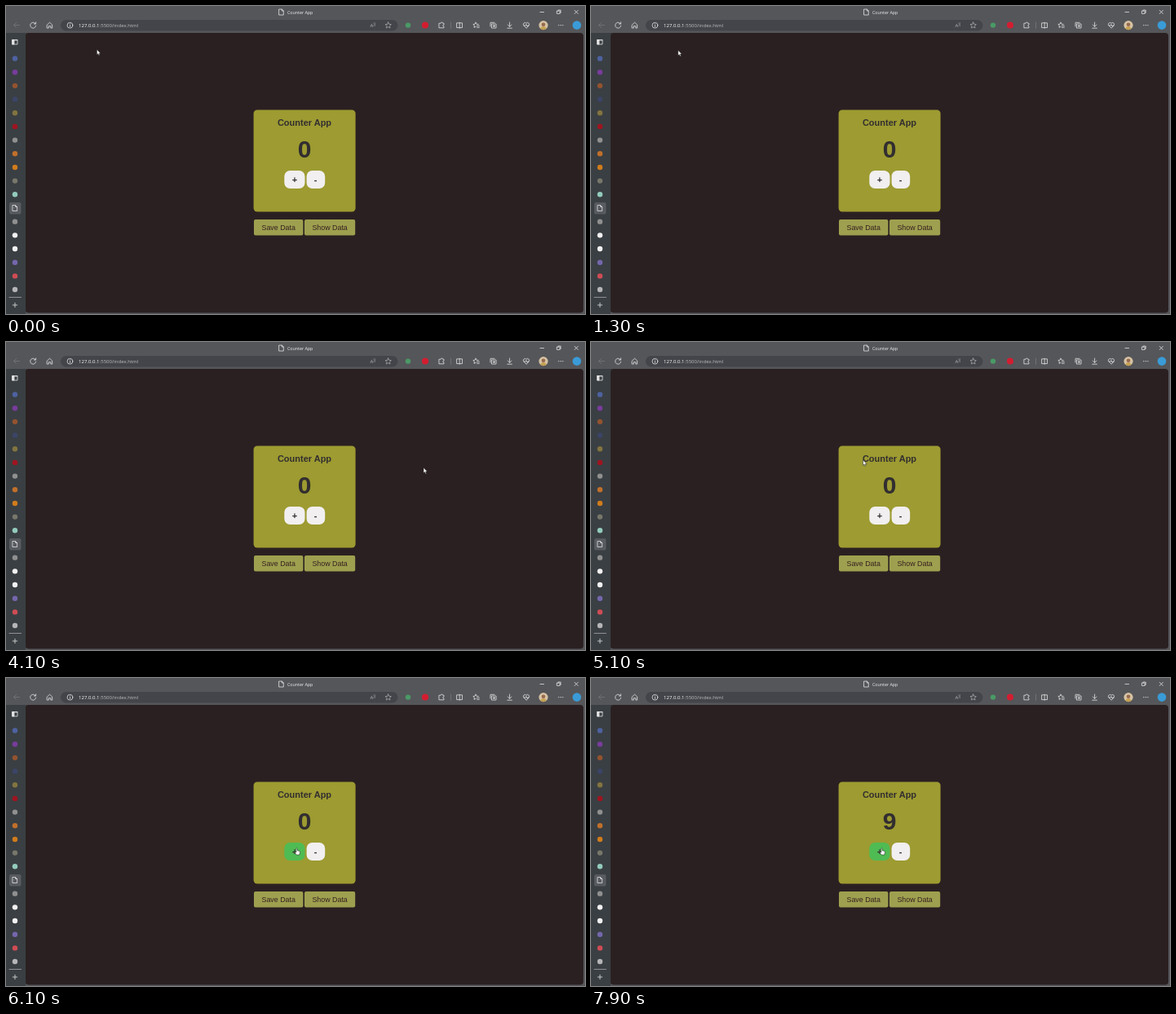
Recreate the animation shown at these times as an HTML page. Size 710 by 378 pixels, loop 8000 ms.

```html
<!DOCTYPE html>
<html lang="en">
<head>
<meta charset="utf-8">
<title>Counter App</title>
<style>
  html, body { margin: 0; width: 100%; height: 100%; overflow: hidden; background: #55565a; }
  svg { display: block; width: 710px; height: 378px; }
  .ui { font-family: "Open Sans", "Noto Sans", sans-serif; }
  .page { font-family: "Liberation Sans", Arial, sans-serif; text-anchor: middle; fill: #322e30; }
  .bold { font-weight: 700; }
  .line { fill: none; stroke: #e2e2e3; stroke-width: .8; stroke-linecap: round; stroke-linejoin: round; }
  .dim { stroke: #a6a7aa; }
  .faint { stroke: #77787c; }
  .key { fill: #f1eff0; }
  .wide { fill: #9ea04f; }
  .label { fill: #361f20; font-size: 8.9px; }
</style>
</head>
<body>
<svg viewBox="0 0 710 378">
  <rect width="710" height="378" fill="#55565a"/>
  <path d="M0 33H28V378H0Z" fill="#3a3f43"/>
  <path d="M24 376H710V378H24Z" fill="#55565a"/>
  <rect x="24" y="33" width="684" height="343.5" rx="4" fill="#2b2021"/>
  <rect x="67" y="17" width="413.5" height="13.5" rx="6.7" fill="#44454a"/>

  <g class="ui">
    <text x="345" y="9.6" font-size="5.3" fill="#f0f0f0">Counter App</text>
    <text x="89" y="25.6" font-size="6.05" fill="#fafafa">127.0.0.1<tspan fill="#bcbdc0">:5500/index.html</tspan></text>
    <text x="446.5" y="25.6" font-size="6" fill="#b4b5b8">A<tspan dy="-1.5" font-size="4.5">))</tspan></text>
  </g>

  <!-- window and toolbar icons -->
  <g class="line">
    <path id="file" d="M335 4H338.3L340.3 6V11H335ZM338.3 4V6H340.3"/>
    <path d="M655 7.5H659.5M675.8 6H679.2V9.4H675.8ZM677 6V5H680.2V8.3H679.2M697.2 5.3L701.4 9.5M701.4 5.3L697.2 9.5"/>
    <path class="faint" d="M16.5 23.5H9.5M12.5 20.5L9.5 23.5L12.5 26.5"/>
    <path d="M36.2 21.8A3.5 3.5 0 1 0 36.7 24.2M36.6 19.8V22H34.4"/>
    <path d="M50.5 23L53.6 20.2L56.7 23V27H54.8V24.6H52.4V27H50.5Z"/>
    <circle cx="78.5" cy="23.7" r="3.4"/>
    <path d="M78.5 23.5V25.4M78.5 21.9V22"/>
    <path class="dim" d="M468.7 19.9L469.8 22.3L472.4 22.6L470.5 24.4L471 27L468.7 25.7L466.4 27L466.9 24.4L465 22.6L467.6 22.3Z"/>
    <path d="M531.3 21.2H533.2A1.2 1.2 0 0 1 535.6 21.2H537V23A1.1 1.1 0 0 0 537 25.2V26.8H531.3Z"/>
    <path class="faint" d="M545.5 20V27.5"/>
    <path d="M553 20.8H559.5V26.6H553ZM556.2 20.2V27.2"/>
    <path d="M576 20.2L577 22.2L579.3 22.5M576 20.2L575 22.2L572.8 22.5L574.4 24L574 26.4L576 25.4M577.5 24.3H580.3M577.5 26.3H580.3"/>
    <path d="M595.8 22H601V27H595.8ZM594 25V20.3H599M598.4 23.2V25.8M597.1 24.5H599.7"/>
    <path d="M617.6 20V25.2M615.3 23L617.6 25.3L619.9 23M614.8 27.2H620.4"/>
    <path d="M638 27L634.8 23.7A1.8 1.8 0 0 1 638 21.3A1.8 1.8 0 0 1 641.2 23.7ZM635 24H637L638 22.6L639 25L640 24H641"/>
    <path d="M677.8 23.6H677.9M680.3 23.6H680.4M682.8 23.6H682.9" stroke-width="1.2"/>
  </g>
  <circle cx="659" cy="23.6" r="5.6" fill="#d6c3a3"/>
  <path d="M655 27.5Q659 22.5 663 27.5A5.6 5.6 0 0 1 655 27.5Z" fill="#c4a050"/>
  <circle cx="659" cy="22.8" r="2.3" fill="#97694f"/>

  <!-- sidebar -->
  <rect x="4" y="241" width="14.5" height="14.5" rx="2" fill="#585b60"/>
  <g class="line">
    <path d="M8 41.5H14V47H8Z"/>
    <path d="M8 41.5H10V47H8ZM8 42H14" fill="#e2e2e3"/>
    <use href="#file" x="-326.7" y="240.5"/>
    <path d="M4 357.5H18.5" class="dim"/>
    <path d="M11 364.3V369.7M8.3 367H13.7"/>
  </g>
  <g id="marks"></g>

  <!-- counter page -->
  <g class="page">
    <rect x="303.6" y="127.4" width="125" height="125.2" rx="4.5" fill="#9d9b31"/>
    <text class="bold" x="366" y="147" font-size="11">Counter App</text>
    <text class="bold" id="count" x="366" y="185.8" font-size="30">0</text>
    <rect class="key" id="plus" x="341.3" y="202" width="25.2" height="22" rx="7"/>
    <rect class="key" x="368.6" y="202" width="22.6" height="22" rx="7"/>
    <text class="bold" x="354" y="216.6" font-size="11">+</text>
    <text class="bold" x="379.6" y="216.6" font-size="11">-</text>
    <rect class="wide" x="304" y="262" width="60.4" height="19.6" rx="2"/>
    <rect class="wide" x="366" y="262" width="62.2" height="19.6" rx="2"/>
    <text class="label" x="334.2" y="274.8">Save Data</text>
    <text class="label" x="397.1" y="274.8">Show Data</text>
  </g>

  <g id="pointer" stroke="#141214" stroke-width=".5" fill="#fff" stroke-linejoin="round">
    <path id="arrow" d="M0 0V6.6L1.5 5.3L2.5 7.5L3.6 7L2.6 4.9H4.6Z"/>
    <path id="hand" d="M-.7 .6Q0 -.4 .6 .6V3L3.2 3.6Q4 3.9 3.9 4.8L3.3 8.2H-.4L-2.3 5.4Q-2.2 4.3 -.7 5.2Z"/>
  </g>
</svg>
<script>
  const $ = id => document.getElementById(id);
  const LOOP = 8000, STEP = 100;

  // plain discs for logos; the sidebar ones sit in an even column
  const disc = (x, y, fill, r = 3.2) => `<circle cx="${x}" cy="${y}" r="${r}" fill="${fill}"/>`;
  const column = `#4d62a0 #783c9c #94532f #3c4468 #82743f #a01420 #8f908f #c0702b #d07c1c
    #77776a #93cbbb none #8f908f #f2f2f3 #f2f2f3 #7466ac #cf4c54 #b6b5b8`.split(/\s+/);
  $('marks').innerHTML = column.map((fill, i) => disc(11, 64.5 + 16.68 * i, fill)).join('') +
    disc(493, 23.6, '#4a9a66') + disc(514, 23.6, '#d31d30', 4) + disc(700, 23.6, '#3a9bd6', 5.3);

  // pointer moves, times in steps; path is a line or a Bezier curve from where it rests
  const home = [111.4, 53.3];
  const moves = [
    { from: 3, to: 13, path: [[461, 473], [461, -72], [106.8, 54.2]] },
    { from: 33, to: 35, path: [[242.8, 110.2]] },
    { from: 40, to: 41, path: [[512, 154.2]] },
    { from: 42, to: 45, path: [[660, 122], [620, 122], [463.5, 141]] },
    { from: 48, to: 51, path: [[333.6, 144.8]] },
    { from: 51, to: 57, path: [[180, -20], [271, 390], [356.6, 208.8]] }
  ];
  const HOVER = 57, FADE = 3, FIRST_CLICK = 65, CLICK_GAP = 1.69;

  const clamp = k => Math.min(1, Math.max(0, k));
  const mix = (a, b, k) => a.map((v, i) => v + (b[i] - v) * k);

  function curve(points, k) {
    while (points.length > 1) points = points.slice(1).map((p, i) => mix(points[i], p, k));
    return points[0];
  }

  const pointerAt = step => moves.reduce(
    (rest, { from, to, path }) => curve([rest, ...path], clamp((step - from) / (to - from))), home);

  function draw(time) {
    const step = Math.floor(time % LOOP / STEP);
    const over = step >= HOVER;
    const green = mix([241, 239, 240], [79, 187, 83], clamp((step - HOVER + 1) / FADE));

    $('pointer').setAttribute('transform', `translate(${pointerAt(step)})`);
    $('arrow').style.display = over ? 'none' : '';
    $('hand').style.display = over ? '' : 'none';
    $('plus').style.fill = `rgb(${green.map(Math.round)})`;
    $('count').textContent = Math.max(0, Math.floor((step + .5 - FIRST_CLICK) / CLICK_GAP) + 1);
    requestAnimationFrame(() => draw(performance.now() - start));
  }
  const start = performance.now();
  draw(0);
</script>
</body>
</html>
```
